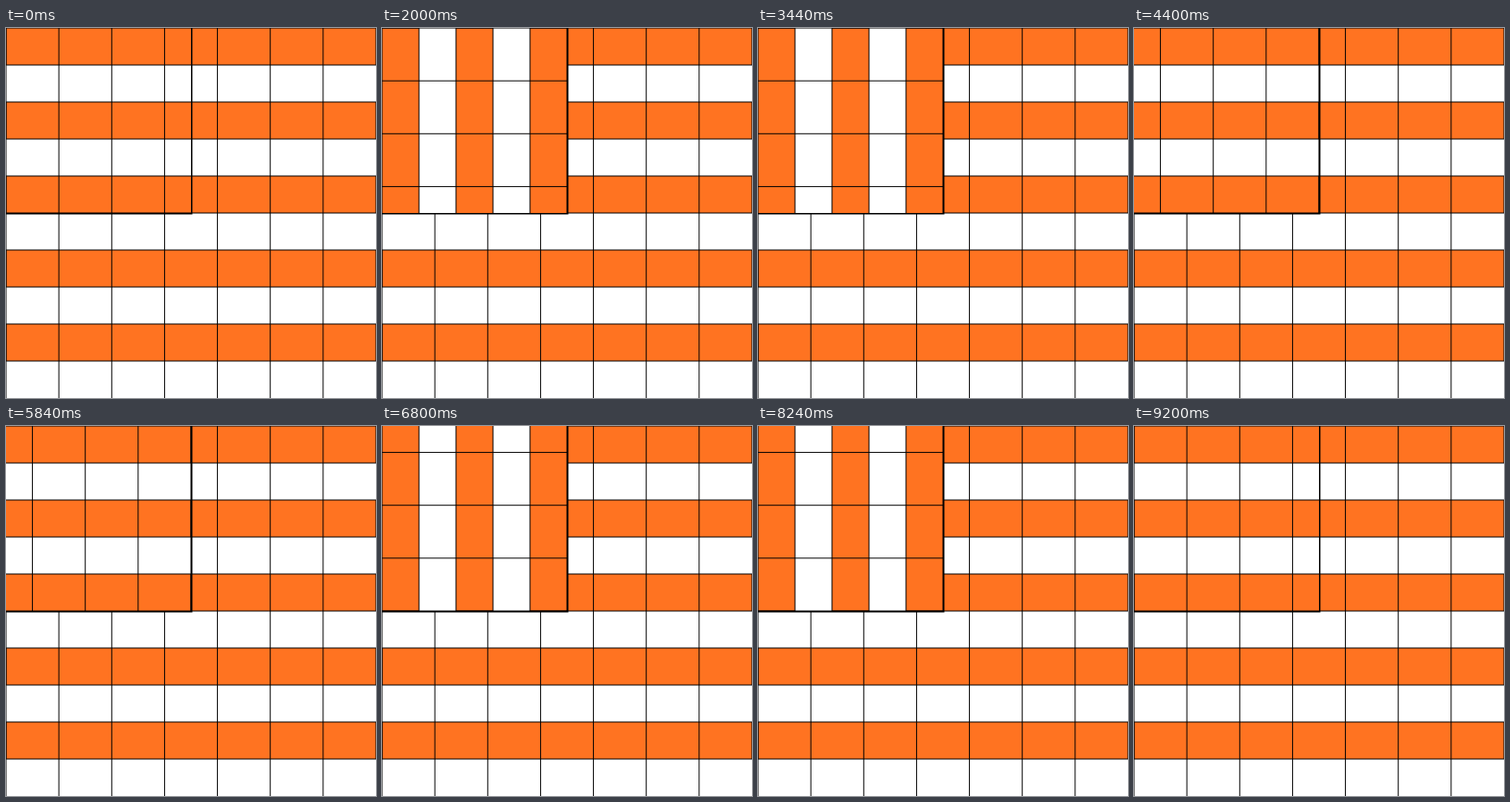
Recreate the animation shown at these times as an HTML page with a canvas. Size 400 by 400 pixels, loop 9.6 s.

```html
<!DOCTYPE html>
<html lang="en">
<head>
<meta charset="utf-8">
<title>Turning quarter</title>
<style>
  html, body { margin: 0; width: 100%; height: 100%; overflow: hidden; background: #fff; }
  canvas { display: block; width: 400px; height: 400px; }
</style>
</head>
<body>
<canvas id="stage" width="400" height="400"></canvas>
<script>
const SIZE = 400, HALF = 200, ROW = 40, COLS = 7;
const LOOP = 9600;
const TURNS = [2000, 4400, 6800, 9200]; // each adds a quarter turn
const ctx = document.getElementById('stage').getContext('2d');

function drawPattern() {
  ctx.lineWidth = 1;
  ctx.fillStyle = '#fff';
  ctx.fillRect(0, 0, SIZE, SIZE);
  ctx.fillStyle = '#ff7321';
  for (let y = 0; y < SIZE; y += 2 * ROW) {
    ctx.fillRect(0, y, SIZE, ROW);
    ctx.strokeRect(0, y, SIZE, ROW);
  }
  ctx.beginPath();
  for (let i = 0; i < COLS; i++) {
    const x = i * SIZE / COLS;
    ctx.moveTo(x, 0);
    ctx.lineTo(x, SIZE);
  }
  ctx.stroke();
}

function drawFrame() {
  ctx.lineWidth = 3;
  ctx.strokeRect(0, 0, HALF, HALF);
}

function drawQuarter(turns) {
  const [c, s] = [[1, 0], [0, 1], [-1, 0], [0, -1]][turns % 4];
  const mid = HALF / 2;
  ctx.save();
  ctx.beginPath();
  ctx.rect(0, 0, HALF, HALF);
  ctx.clip();
  ctx.transform(c, s, -s, c, mid - mid * c + mid * s, mid - mid * s - mid * c);
  drawPattern();
  ctx.restore();
}

function render(t) {
  drawPattern();
  drawFrame();
  drawQuarter(TURNS.filter(at => t >= at).length);
}

const start = performance.now();
function tick() {
  render((performance.now() - start) % LOOP);
  requestAnimationFrame(tick);
}
tick();
</script>
</body>
</html>
```
